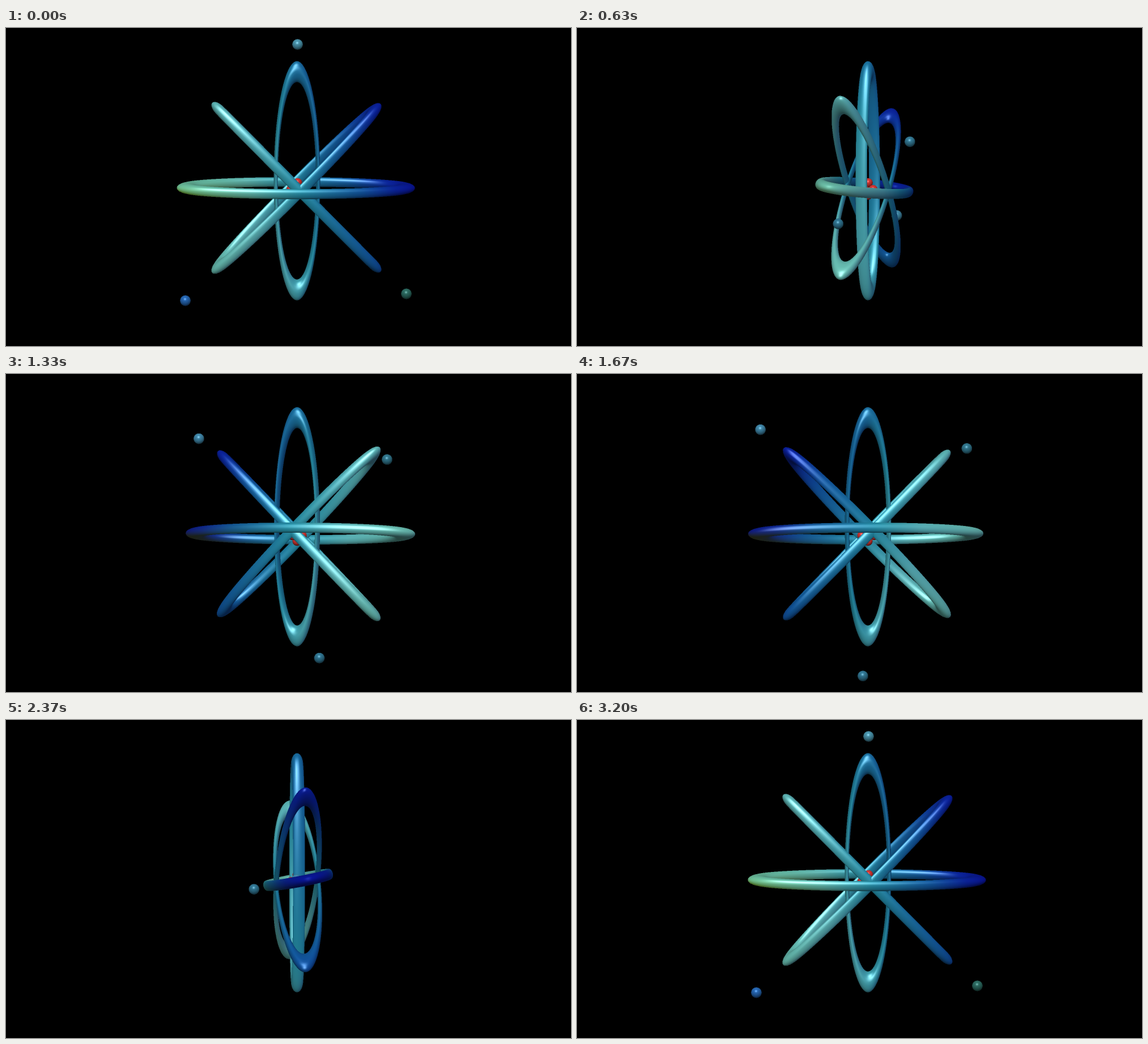
These frames come from a looping animation (997 px wide and 561 px high, 3230 ms). An HTML page with a canvas:

```html
<!DOCTYPE html>
<html lang="en">
<head>
<meta charset="utf-8">
<title>Atom</title>
<style>
html, body { margin: 0; width: 100%; height: 100%; overflow: hidden; background: #000; }
canvas { display: block; }
</style>
</head>
<body>
<canvas id="stage" width="997" height="561"></canvas>
<script>
const LOOP = 3230, STEP = 100 / 3, LAST = 96;
const CX = 513.5, CY = 282, CAMERA = 1900;

// The scene is drawn into a double-size buffer over this area, then scaled down.
const AREA = { x: 294, y: 12, w: 446, h: 538 }, SS = 2;
const W = AREA.w * SS, H = AREA.h * SS;

const ctx = document.getElementById('stage').getContext('2d');
const buffer = document.createElement('canvas');
buffer.width = W;
buffer.height = H;
const bctx = buffer.getContext('2d');
const image = bctx.createImageData(W, H);
const pixels = new Uint32Array(image.data.buffer);
const depth = new Float32Array(W * H);

const TAU = Math.PI * 2;
const rad = d => d * Math.PI / 180;
const mix = (a, b, k) => a.map((v, i) => v + (b[i] - v) * k);
const unit = v => { const l = Math.hypot(...v); return v.map(c => c / l); };
const cross = (a, b) => [a[1] * b[2] - a[2] * b[1], a[2] * b[0] - a[0] * b[2], a[0] * b[1] - a[1] * b[0]];
const pack = (r, g, b) => 0xff000000 | Math.min(255, b) << 16 | Math.min(255, g) << 8 | Math.min(255, r);

const LIGHT = unit([-0.12, 0.55, 0.82]);
const HALF = unit([LIGHT[0], LIGHT[1], LIGHT[2] + 1]);
const STOPS = [
  [-1, [112, 198, 180]], [-0.4, [92, 182, 186]], [0, [38, 144, 168]],
  [0.5, [18, 88, 160]], [0.8, [12, 38, 160]], [1, [10, 22, 158]]
];

function ringColour(x) {
  let i = 1;
  while (i < STOPS.length - 1 && x > STOPS[i][0]) i++;
  const [x0, a] = STOPS[i - 1], [x1, b] = STOPS[i];
  return mix(a, b, Math.max(0, Math.min(1, (x - x0) / (x1 - x0))));
}

function shade(base, nx, ny, nz, gloss) {
  const facing = nx * LIGHT[0] + ny * LIGHT[1] + nz * LIGHT[2];
  const lit = 0.36 + 0.62 * Math.max(0, facing * 0.85 + 0.15);
  const shine = gloss * Math.pow(Math.max(0, nx * HALF[0] + ny * HALF[1] + nz * HALF[2]), 44);
  return [base[0] * lit + 190 * shine, base[1] * lit + 205 * shine, base[2] * lit + 210 * shine];
}

// Elliptical rings: a torus squeezed along one axis of its plane.
const MAJOR = 192.5, MINOR = 18.5, ALONG = 168, AROUND = 20;

function makeRing({ angle, tilt, half, squeeze = 0.195, lift = 0, warm = 0 }) {
  const c = Math.cos(rad(angle)), s = Math.sin(rad(angle));
  const u = [c, s, 0];
  const w = [-s * tilt, c * tilt, Math.sqrt(1 - tilt * tilt)];
  const n = cross(u, w);
  const verts = [];
  for (let i = 0; i < ALONG; i++) {
    const ct = Math.cos(TAU * i / ALONG), st = Math.sin(TAU * i / ALONG);
    for (let j = 0; j < AROUND; j++) {
      const cp = Math.cos(TAU * j / AROUND), sp = Math.sin(TAU * j / AROUND);
      const r = MAJOR + MINOR * cp;
      const at = k => u[k] * r * ct + w[k] * r * squeeze * st + n[k] * half * sp;
      const normal = unit([0, 1, 2].map(k =>
        u[k] * cp * ct + w[k] * cp * st / squeeze + n[k] * sp * MINOR / half));
      const pos = [at(0), at(1) + lift, at(2)];
      verts.push({ pos, normal, base: ringColour((pos[0] + 0.25 * pos[1]) / 211) });
    }
  }
  return { verts, warm };
}

const rings = [
  { angle: 90, tilt: 1, half: 10.5, lift: 12.5 },
  { angle: 0, tilt: -0.2, half: 8.8, squeeze: 0.28, warm: 1 },
  { angle: 45, tilt: -0.17, half: 9 },
  { angle: 135, tilt: 0.08, half: 9 }
].map(makeRing);

function turn([x, y, z], c, s) {
  return [x * c + z * s, y, z * c - x * s];
}

function project([x, y, z]) {
  const k = CAMERA / (CAMERA - z);
  return [(CX + x * k - AREA.x) * SS, (CY - y * k - AREA.y) * SS, z, k];
}

function triangle(a, b, c) {
  const area = (b.x - a.x) * (c.y - a.y) - (b.y - a.y) * (c.x - a.x);
  if (Math.abs(area) < 1e-6) return;
  const x0 = Math.max(0, Math.ceil(Math.min(a.x, b.x, c.x) - 0.5));
  const x1 = Math.min(W - 1, Math.floor(Math.max(a.x, b.x, c.x) - 0.5));
  const y0 = Math.max(0, Math.ceil(Math.min(a.y, b.y, c.y) - 0.5));
  const y1 = Math.min(H - 1, Math.floor(Math.max(a.y, b.y, c.y) - 0.5));
  const dv = (c.y - a.y) / area, dw = (a.y - b.y) / area;
  for (let y = y0; y <= y1; y++) {
    const px = x0 + 0.5 - a.x, py = y + 0.5 - a.y;
    let v = (px * (c.y - a.y) - py * (c.x - a.x)) / area;
    let w = (py * (b.x - a.x) - px * (b.y - a.y)) / area;
    for (let x = x0, p = y * W + x0; x <= x1; x++, p++, v += dv, w += dw) {
      const u = 1 - v - w;
      if (u < -1e-5 || v < -1e-5 || w < -1e-5) continue;
      const z = a.z * u + b.z * v + c.z * w;
      if (z <= depth[p]) continue;
      depth[p] = z;
      pixels[p] = pack(a.r * u + b.r * v + c.r * w, a.g * u + b.g * v + c.g * w, a.b * u + b.b * v + c.b * w);
    }
  }
}

function drawRing(ring, c, s) {
  const pts = ring.verts.map(v => {
    const pos = turn(v.pos, c, s);
    const [nx, ny, nz] = turn(v.normal, c, s);
    const [x, y, z] = project(pos);
    let [r, g, b] = shade(v.base, nx, ny, nz, 0.72);
    b += 18 * Math.max(0, nx * 0.9 - ny * 0.2);
    if (ring.warm) {
      const left = Math.max(0, -pos[0] / 211);
      const rim = left * Math.max(0, 0.55 - 0.5 * ny);
      r += 26 * rim;
      g += 24 * rim;
      b -= 30 * left * (0.4 + rim);
    }
    return { x, y, z, nz, r, g, b: Math.max(0, b) };
  });
  for (let i = 0; i < ALONG; i++) {
    const row = i * AROUND, next = (i + 1) % ALONG * AROUND;
    for (let j = 0; j < AROUND; j++) {
      const k = (j + 1) % AROUND;
      const p = pts[row + j], q = pts[row + k], m = pts[next + k], n = pts[next + j];
      if (Math.max(p.nz, q.nz, m.nz, n.nz) < -0.15) continue;
      triangle(p, q, m);
      triangle(p, m, n);
    }
  }
}

function drawBall(x, y, z, radius, base, gloss) {
  const r = radius * SS;
  for (let py = Math.floor(y - r); py <= y + r; py++) {
    for (let px = Math.floor(x - r); px <= x + r; px++) {
      if (px < 0 || py < 0 || px >= W || py >= H) continue;
      const nx = (px + 0.5 - x) / r, ny = (y - py - 0.5) / r, d = nx * nx + ny * ny;
      if (d > 1) continue;
      const nz = Math.sqrt(1 - d), p = py * W + px, bz = z + nz * radius;
      if (bz <= depth[p]) continue;
      depth[p] = bz;
      pixels[p] = pack(...shade(base, nx, ny, nz, gloss));
    }
  }
}

const nucleus = [[1, 9, 0], [0, -13, 0]];
for (let i = 0; i < 4; i++) {
  nucleus.push([11 * Math.cos(TAU * i / 4 + 0.3), -3, 11 * Math.sin(TAU * i / 4 + 0.3)]);
}

// Electrons run on fixed paths: offsets from the centre, y downwards.
const electrons = [
  { at: (c, s) => [1 + 77 * s, -253 * c, 0], from: [78, 155, 180], to: [52, 125, 155] },
  { at: (c, s) => [-187 * c - 10 * c * c + 9 * s, 175 * c + 24 * c * c + 5 * s, 150 * c + 60 * s],
    from: [40, 108, 188], to: [52, 124, 148] },
  { at: (c, s) => [193 * c - 12 * s, 187 * c - 12 * s, -120 * s], from: [46, 112, 102], to: [68, 142, 178] }
];

function draw(step) {
  const phase = TAU * step / LAST;
  const angle = phase + rad(6.8 - 1.5 * Math.cos(2 * phase) - 9 * Math.sin(2 * phase) - 2 * Math.sin(phase));
  const c = Math.cos(angle), s = Math.sin(angle);
  pixels.fill(0xff000000);
  depth.fill(-1e9);
  rings.forEach(ring => drawRing(ring, c, s));
  for (const part of nucleus) {
    const [x, y, z, k] = project(turn(part, c, s));
    drawBall(x, y, z, 8 * k, [222, 58, 54], 0.4);
  }
  const cp = Math.cos(phase), sp = Math.sin(phase);
  const tint = Math.max(0, cp) ** 2;
  for (const e of electrons) {
    const [x, y, z] = e.at(cp, sp);
    drawBall((CX + x - AREA.x) * SS, (CY + y - AREA.y) * SS, z, 9.3, mix(e.to, e.from, tint), 0.4);
  }
  bctx.putImageData(image, 0, 0);
  ctx.fillStyle = '#000';
  ctx.fillRect(0, 0, 997, 561);
  ctx.drawImage(buffer, AREA.x, AREA.y, AREA.w, AREA.h);
}

const start = performance.now();
let shown = -1;

function tick() {
  const t = (performance.now() - start) % LOOP;
  const step = Math.min(LAST, Math.floor((t + 3.5) / STEP));
  if (step !== shown) draw(shown = step);
  requestAnimationFrame(tick);
}
tick();
</script>
</body>
</html>
```
